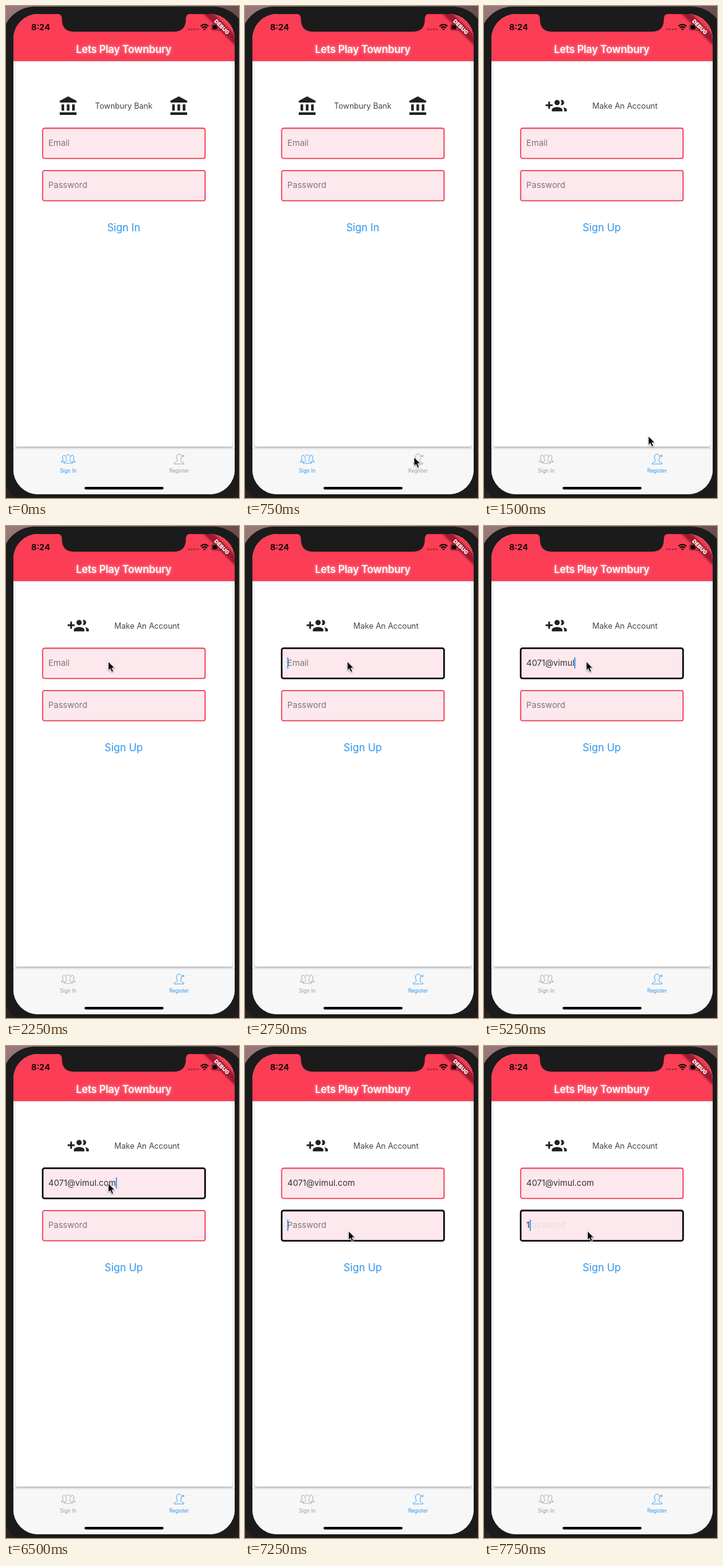
An HTML page that plays this animation: 377x795 px, repeating every 8 s.

```html
<!DOCTYPE html>
<html lang="en">
<head>
<meta charset="utf-8">
<title>Sign up demo</title>
<style>
  html, body { margin: 0; width: 100%; height: 100%; overflow: hidden; background: #2c1c1e; }
  svg { display: block; width: 100vw; height: 100vh; font-family: Inter, "Liberation Sans", sans-serif; }
  .mid { text-anchor: middle; }
  .title { font-size: 16.8px; font-weight: 600; letter-spacing: -.25px; fill: #fff; text-shadow: 0 0 5px #fff9; }
  .clock { font-size: 13.7px; font-weight: 600; }
  .head { font-size: 12.65px; fill: #444; }
  .action { font-size: 16.6px; fill: #2c97ee; }
  .box { fill: #fde8ed; stroke: #f03f55; stroke-width: 1.8; }
  .focus .box { stroke: #000; stroke-width: 2.6; }
  .hint, .value { font-size: 13.6px; fill: #7d7478; }
  .value { fill: #333; }
  .caret { fill: #2c97ee; visibility: hidden; }
  .focus .caret { visibility: visible; }
  .tab { color: #9b9b9b; font-size: 8.3px; }
  .tab.on { color: #2c97ee; }
  .tab text { fill: currentColor; }
  .tab g { fill: none; stroke: currentColor; stroke-width: .9; stroke-linejoin: round; }
  .band { fill: #a3182f; fill-opacity: .82; filter: drop-shadow(0 0 2px #0009); }
  .debug { font-size: 8.7px; font-weight: 900; fill: #fff; }
  .pointer { filter: drop-shadow(0 1px 1px #0006); }
</style>
</head>
<body>
<svg viewBox="0 0 377 795">
  <defs>
    <clipPath id="screen"><rect x="12" y="13" width="358" height="776" rx="40"/></clipPath>
    <linearGradient id="desk" x2=".25" y2="1">
      <stop stop-color="#9a7a7a"/><stop offset=".25" stop-color="#6a4c50"/><stop offset="1" stop-color="#2c1c1e"/>
    </linearGradient>
    <filter id="soft" x="-5%" y="-5%" width="110%" height="110%"><feGaussianBlur stdDeviation="1.3"/></filter>
    <path id="bank" d="M4 10v7h3v-7H4zm6 0v7h3v-7h-3zM2 22h19v-3H2v3zm14-12v7h3v-7h-3zm-4.5-9L2 6v2h19V6l-9.5-5z"/>
    <path id="bust" d="M-8 8C-7.5 4-3 5.5-2.3 2.6C-5-.5-5-8 0-8S5-.5 2.3 2.6C3 5.5 7.5 4 8 8Z"/>
  </defs>

  <rect width="377" height="795" fill="url(#desk)"/>
  <rect x="-7" y="1" width="396" height="804" rx="54" fill="#1b1b1b"/>

  <g clip-path="url(#screen)">
    <rect width="377" height="795" fill="#fbfbfb"/>
    <rect x="15" y="92" width="352" height="621.5" rx="4" fill="#000" opacity=".36" filter="url(#soft)"/>
    <rect x="15" y="85" width="352" height="627" rx="3.5" fill="#fff"/>
    <rect y="14" width="377" height="75.5" fill="#000" opacity=".22" filter="url(#soft)"/>
    <rect width="377" height="89" fill="#fb3d55"/>
    <rect y="715" width="377" height="80" fill="#f7f7f8"/>
    <rect y="715" width="377" height="1" fill="#dcdcde"/>

    <text class="title mid" x="190.5" y="76">Lets Play Townbury</text>
    <text class="clock" x="40.7" y="39.4">8:24</text>

    <g fill="#b42b40">
      <circle cx="296" cy="37.8" r="1.8"/><circle cx="300.7" cy="37.8" r="1.8"/>
      <circle cx="305.4" cy="37.8" r="1.8"/><circle cx="310.1" cy="37.8" r="1.8"/>
    </g>
    <g fill="none" stroke="#000" stroke-width="2">
      <path d="M314.8 32.6q6.4-5.6 12.8 0M317 35.3q4.2-3.6 8.4 0"/>
      <path d="M319.2 37l2 2.4 2-2.4q-2-1.5-4 0z" fill="#000" stroke="none"/>
    </g>
    <rect x="332.4" y="29.6" width="18" height="9.6" rx="2.4" fill="none" stroke="#7a2030"/>
    <rect x="334" y="31" width="8" height="6.8" rx="1" fill="#000"/>

    <g transform="translate(370 13) rotate(45)">
      <rect class="band" x="-50" y="24.2" width="100" height="10.4"/>
      <text class="debug mid" y="32.5">DEBUG</text>
    </g>

    <g id="signIn">
      <g class="head">
        <use href="#bank" transform="translate(84.1 144.6) scale(1.43)" fill="#222"/>
        <use href="#bank" transform="translate(263.1 144.6) scale(1.43)" fill="#222"/>
        <text class="mid" x="190.5" y="166">Townbury Bank</text>
      </g>
      <text class="action mid" x="190.5" y="363.5">Sign In</text>
    </g>
    <g id="signUp">
      <g class="head">
        <path fill="#222" transform="translate(99.7 144.6) scale(1.43)" d="M8 10H5V7H3v3H0v2h3v3h2v-3h3v-2zm10 1c1.66 0 2.99-1.34 2.99-3S19.66 5 18 5c-.32 0-.63.05-.91.14.57.81.9 1.79.9 2.86s-.34 2.04-.9 2.86c.28.09.59.14.91.14zm-5 0c1.66 0 2.99-1.34 2.99-3S14.66 5 13 5c-1.66 0-3 1.34-3 3s1.34 3 3 3zm6.62 2.16c.83.73 1.38 1.66 1.38 2.84v2h3v-2c0-1.54-2.37-2.49-4.38-2.84zM13 13c-2 0-6 1-6 3v2h12v-2c0-2-4-3-6-3z"/>
        <text x="175.3" y="166">Make An Account</text>
      </g>
      <text class="action mid" x="190.5" y="363.5">Sign Up</text>
    </g>

    <g id="email" transform="translate(58 196)">
      <rect class="box" x="1.3" y="1.5" width="262.8" height="48.8" rx="3"/>
      <text class="hint" x="10.6" y="30">Email</text>
      <text class="value" x="10.6" y="30"></text>
      <rect class="caret" y="16" width="1.8" height="18.5" rx=".9"/>
    </g>
    <g id="password" transform="translate(58 264.4)">
      <rect class="box" x="1.3" y="1.5" width="262.8" height="48.8" rx="3"/>
      <text class="hint" x="10.6" y="30">Password</text>
      <text class="value" x="10.6" y="30"></text>
      <rect class="caret" y="16" width="1.8" height="18.5" rx=".9"/>
    </g>

    <g id="tabIn" class="tab">
      <g transform="translate(100.7 732)">
        <path d="M-5.5 4.6H-11.5C-11.2 2.4-8.4 3-8 1.2C-10-1.5-9.5-6-6.7-6Q-5-6-4.3-4M5.5 4.6H11.5C11.2 2.4 8.4 3 8 1.2C10-1.5 9.5-6 6.7-6Q5-6 4.3-4"/>
        <use href="#bust" transform="scale(.87)"/>
      </g>
      <text class="mid" x="100.7" y="754">Sign In</text>
    </g>
    <g id="tabUp" class="tab">
      <g transform="translate(280 732)">
        <use href="#bust"/>
        <path d="M5-5h4M7-7v4"/>
      </g>
      <text class="mid" x="280" y="754">Register</text>
    </g>
    <rect x="127" y="777" width="128" height="4.2" rx="2.1"/>
  </g>

  <path d="M83 12.5q7.5.5 7.5 8v1q0 20 20 20h160.5q20 0 20-20v-1q0-7.5 7.5-8z" fill="#1b1b1b"/>
  <path id="pointer" class="pointer" d="M0 0V14.4L3.2 11.4 5.6 17 8.2 15.9 5.8 10.4H10.3Z" fill="#000" stroke="#fff" stroke-width=".9"/>
</svg>

<script>
  const LOOP = 8000, TICK = 250;
  const ADDRESS = "4071@vimul.com";
  // [time, characters entered]
  const emailKeys = [[0, 0], [3000, 1], [3250, 2], [3500, 3], [3750, 4], [4250, 5],
    [4750, 6], [5000, 8], [5250, 10], [6000, 11], [6250, 12], [6500, 14]];
  const passKeys = [[0, 0], [7750, 1]];
  // [time, x, y]
  const route = [[250, 330, 790], [500, 286, 742], [750, 273.5, 729], [1250, 273.5, 729],
    [1500, 266, 695], [1750, 222, 480], [2000, 171, 250], [2250, 165.5, 219],
    [6250, 165.5, 219], [6500, 165.5, 222], [6750, 166.5, 266], [7000, 167.5, 299]];

  const $ = id => document.getElementById(id);
  const show = (el, on) => { el.style.display = on ? "" : "none"; };

  function field(id) {
    const root = $(id);
    const [hint, value, caret] = ["hint", "value", "caret"].map(c => root.querySelector("." + c));
    return (text, focused) => {
      root.classList.toggle("focus", focused);
      value.textContent = text;
      // the hint lingers for a moment after the first key
      hint.style.opacity = text.length === 0 ? 1 : text.length === 1 ? .12 : 0;
      caret.setAttribute("x", 10.4 + (text ? value.getComputedTextLength() : 0));
    };
  }

  const typed = (keys, t) => keys.filter(k => k[0] <= t).pop()[1];

  function place(t) {
    const i = route.findIndex(p => p[0] > t);
    if (i < 0) return route[route.length - 1].slice(1);
    const a = route[i - 1], b = route[i], f = (t - a[0]) / (b[0] - a[0]);
    return [a[1] + (b[1] - a[1]) * f, a[2] + (b[2] - a[2]) * f];
  }

  const email = field("email"), password = field("password");

  function draw(t) {
    const register = t >= 1000, onPassword = t >= 7250, pointing = t >= route[0][0];
    show($("signIn"), !register);
    show($("signUp"), register);
    $("tabIn").classList.toggle("on", !register);
    $("tabUp").classList.toggle("on", register);
    email(ADDRESS.slice(0, typed(emailKeys, t)), t >= 2500 && !onPassword);
    password("1".slice(0, typed(passKeys, t)), onPassword);
    show($("pointer"), pointing);
    if (pointing) $("pointer").setAttribute("transform", `translate(${place(t)})`);
  }

  let start, last = -1;
  function loop(now) {
    start ??= now;
    const t = Math.floor(((now - start) % LOOP) / TICK) * TICK;
    if (t !== last) draw(last = t);
    requestAnimationFrame(loop);
  }
  draw(0);
  requestAnimationFrame(loop);
</script>
</body>
</html>
```
